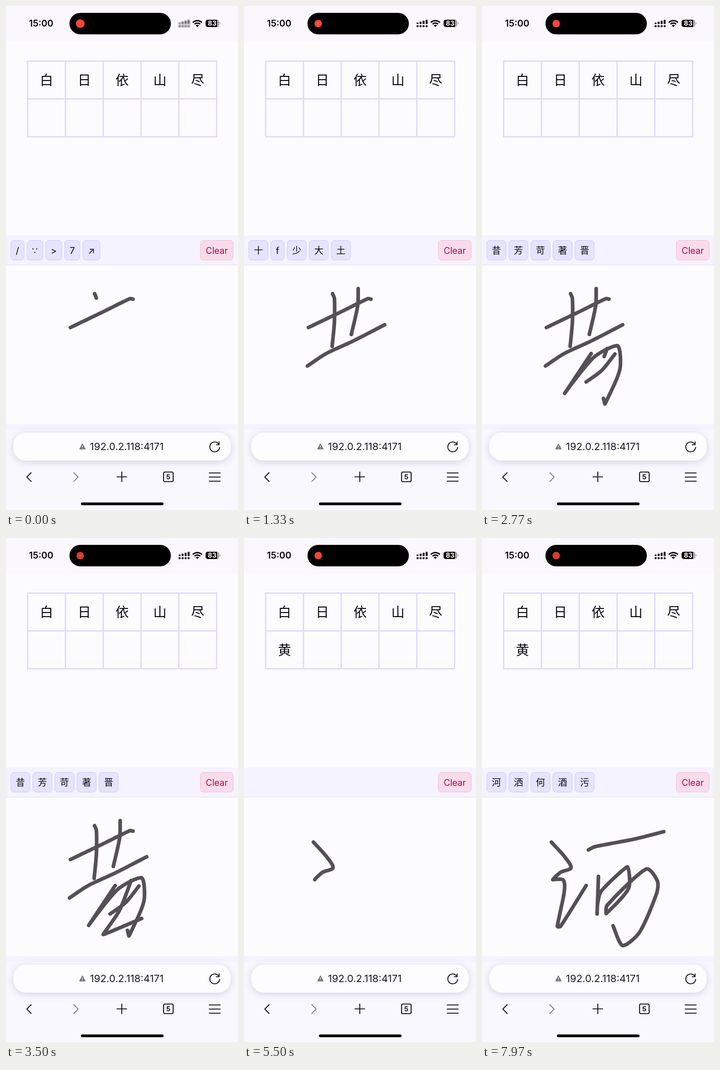
Write an HTML page with a canvas that moves like this. It is 508 by 1102 pixels and loops after 8 s.

```html
<!DOCTYPE html>
<html lang="zh-CN">
<head>
<meta charset="utf-8">
<title>Handwriting input</title>
<style>
  html, body { margin: 0; width: 508px; height: 1102px; overflow: hidden; background: #fcfcff; }
  canvas { display: block; width: 508px; height: 1102px; }
</style>
</head>
<body>
<canvas id="stage"></canvas>
<script>
const W = 508, H = 1102, LOOP = 8000;
const TAP = 4800;       // the chosen character moves into the grid
const PULSE = 1470;     // period of the recording light
const PEN_SPEED = 0.6;  // px per ms
const CELL = 82.75;
const LATIN = 'Inter, "Noto Sans", sans-serif';
const HAN = '"Noto Sans CJK SC", "Noto Sans CJK", sans-serif';
const KEYS = 'Inter, "DejaVu Sans", "Noto Sans CJK SC", sans-serif';
const DARK = '#1b1a1e', BLACK = '#050507', PAPER = '#fdfcff';

const canvas = document.getElementById('stage');
const ctx = canvas.getContext('2d');
const dpr = window.devicePixelRatio || 1;
canvas.width = W * dpr;
canvas.height = H * dpr;

const clamp = v => Math.max(0, Math.min(1, v));
const mix = (a, b, k) => a + (b - a) * k;
const dist = (a, b) => Math.hypot(b[0] - a[0], b[1] - a[1]);

// Smooth curve through key points; turns beyond a right angle stay sharp.
function curve(pts) {
  const out = [];
  const at = i => pts[Math.max(0, Math.min(pts.length - 1, i))];
  const tangent = (i, span) => {
    const [p, q, n] = [at(i - 1), at(i), at(i + 1)];
    const dot = (q[0] - p[0]) * (n[0] - q[0]) + (q[1] - p[1]) * (n[1] - q[1]);
    const cos = dot / (dist(p, q) * dist(q, n) || 1);
    const k = Math.min(0.5, span * 0.8 / (dist(p, n) || 1)) * Math.min(1, 1 + cos);
    return [(n[0] - p[0]) * k, (n[1] - p[1]) * k];
  };
  for (let i = 0; i < pts.length - 1; i++) {
    const a = pts[i], b = pts[i + 1], span = dist(a, b);
    const ta = tangent(i, span), tb = tangent(i + 1, span);
    for (let s = 0; s <= 12; s++) {
      const t = s / 12, u = 1 - t;
      out.push([0, 1].map(j => u * u * (1 + 2 * t) * a[j] + t * u * u * ta[j]
        + t * t * (1 + 2 * u) * b[j] - t * t * u * tb[j]));
    }
  }
  return out;
}

const stroke = (start, ...pts) => ({ start, path: curve(pts) });

const firstChar = [
  stroke(-700, [141, 703], [214, 668], [271, 640], [278, 641]),
  stroke(-16, [194, 629], [198, 640], [198, 690], [193, 744]),
  stroke(400, [250, 618], [249, 655], [235, 718]),
  stroke(900, [139, 787], [180, 760], [240, 732], [308, 697]),
  stroke(1460, [239, 760], [181, 847], [245, 768], [297, 743], [302, 794], [271, 867]),
  stroke(2140, [269, 870], [266, 858]),
  stroke(2380, [228, 822], [262, 797], [291, 761]),
  stroke(2740, [274, 749], [248, 815], [213, 867], [297, 832]),
  stroke(3540, [297, 832], [268, 865], [219, 911]),
  stroke(3990, [314, 867], [351, 890])
];

const secondChar = [
  stroke(5300, [152, 665], [181, 697], [195, 721], [172, 731], [155, 747], [178, 748],
    [180, 774], [165, 849], [172, 849], [228, 760]),
  stroke(6140, [233, 682], [247, 675], [335, 658], [398, 642]),
  stroke(6660, [255, 740], [252, 822]),
  stroke(6880, [253, 800], [261, 772], [318, 719], [321, 766], [272, 821], [274, 803],
    [359, 724], [384, 750], [382, 778], [345, 862], [308, 891], [287, 848])
];

const suggestions = [
  [0, '/∵>7↗'], [390, '十f少大土'], [1370, '世共芯艾母'], [2680, '昔芳苛著晋'],
  [4250, '黄贯蓑菱贵'], [TAP, ''], [5980, '三立之主兰'], [7780, '河洒何酒污']
];

function text(str, x, y, font, color) {
  ctx.font = font;
  ctx.fillStyle = color;
  ctx.textAlign = 'center';
  ctx.fillText(str, x, y);
}

function box(x, y, w, h, r, fill, edge) {
  ctx.beginPath();
  ctx.roundRect(x, y, w, h, r);
  if (fill) { ctx.fillStyle = fill; ctx.fill(); }
  if (edge) { ctx.strokeStyle = edge; ctx.stroke(); }
}

function line(color, width, ...pts) {
  ctx.strokeStyle = color;
  ctx.lineWidth = width;
  ctx.beginPath();
  pts.forEach(p => ctx.lineTo(...p));
  ctx.stroke();
}

function band(y, h, color) {
  ctx.fillStyle = color;
  ctx.fillRect(0, y, W, h);
}

function signal(haze) {
  ctx.save();
  if (haze > 0) ctx.filter = `blur(${1.6 * haze * dpr}px)`;
  ctx.globalAlpha = 1 - 0.25 * haze;
  for (let i = 0; i < 4; i++) {
    const x = 378 + i * 6.6, top = 36.2 - i * 2;
    box(x, top, 4.2, 39.5 - top, 1.2, BLACK);
    box(x, 42, 4.2, 4.2, 1.2, BLACK);
  }
  ctx.restore();
}

function wifi() {
  const fan = [-Math.PI * 0.75, -Math.PI * 0.25];
  ctx.save();
  ctx.lineCap = 'butt';
  ctx.strokeStyle = ctx.fillStyle = BLACK;
  ctx.lineWidth = 3;
  for (const r of [14, 8.8]) {
    ctx.beginPath();
    ctx.arc(419, 46, r, ...fan);
    ctx.stroke();
  }
  ctx.beginPath();
  ctx.moveTo(419, 46);
  ctx.arc(419, 46, 5, ...fan);
  ctx.fill();
  ctx.restore();
}

function battery() {
  box(437, 30, 30, 16, 5, '#a9a7ae');
  box(437, 30, 25, 16, [5, 0, 0, 5], BLACK);
  box(468, 35.5, 1.8, 5, 1, '#b5b3ba');
  text('83', 451.5, 43.2, `700 14.5px ${LATIN}`, '#fff');
}

function statusBar(t) {
  const haze = 1 - clamp((t - 100) / 300);
  const glow = (1 - Math.cos((t - 630) / PULSE * 2 * Math.PI)) / 2;
  band(0, 78, '#faf7fe');
  text('15:00', 77, 45, `600 20px ${LATIN}`, BLACK);
  box(139, 15, 222, 47, 23.5, '#000');
  ctx.fillStyle = `rgb(${mix(214, 255, glow)},${mix(62, 70, glow)},${mix(48, 58, glow)})`;
  ctx.beginPath();
  ctx.arc(162.5, 38.5, mix(8.2, 9.6, haze), 0, 7);
  ctx.fill();
  signal(haze);
  wifi();
  battery();
}

function grid(t) {
  const x0 = 47.4, y0 = 120.4, color = '#dcd9ff';
  for (let i = 0; i <= 5; i++) line(color, 2.8, [x0 + i * CELL, y0], [x0 + i * CELL, y0 + 2 * CELL]);
  for (let i = 0; i <= 2; i++) line(color, 2.8, [x0, y0 + i * CELL], [x0 + 5 * CELL, y0 + i * CELL]);
  const rows = ['白日依山尽', t < TAP ? '' : '黄'];
  rows.forEach((row, r) => [...row].forEach((ch, c) =>
    text(ch, x0 + (c + 0.5) * CELL, 173 + r * CELL, `29px ${HAN}`, '#08080a')));
}

function toolbar(t) {
  band(502, 65, '#f5f3ff');
  band(566, 1, '#dfdcf0');
  ctx.lineWidth = 1;
  const font = `20px ${KEYS}`;
  const keys = suggestions.filter(s => s[0] <= t).pop()[1];
  let x = 10.5;
  for (const ch of keys) {
    ctx.font = font;
    const w = ctx.measureText(ch).width + 22;
    box(x, 512.5, w, 43, 7, '#e6e3ff', '#cbc8f6');
    text(ch, x + w / 2, 541.5, font, '#08080a');
    x += w + 6.3;
  }
  box(425.5, 512.5, 72, 43, 7, '#f8dcec', '#f3bccb');
  text('Clear', 461.5, 541.5, `19.4px ${LATIN}`, '#b2063f');
}

function ink({ start, path }, t) {
  let left = (t - start) * PEN_SPEED;
  if (left < 0) return;
  ctx.beginPath();
  ctx.moveTo(...path[0]);
  for (let i = 1; i < path.length && left > 0; i++) {
    const a = path[i - 1], b = path[i], d = dist(a, b);
    const k = d ? clamp(left / d) : 1;
    ctx.lineTo(mix(a[0], b[0], k), mix(a[1], b[1], k));
    left -= d;
  }
  ctx.stroke();
}

function pad(t) {
  ctx.save();
  ctx.beginPath();
  ctx.rect(0, 567, W, 347);
  ctx.clip();
  ctx.strokeStyle = '#555053';
  ctx.lineWidth = 8;
  (t < TAP ? firstChar : secondChar).forEach(s => ink(s, t));
  ctx.restore();
}

function addressBar() {
  ctx.save();
  ctx.shadowColor = 'rgba(60,50,90,.2)';
  ctx.shadowBlur = 18 * dpr;
  ctx.shadowOffsetY = 3 * dpr;
  box(16, 933, 476, 61, 27, PAPER);
  ctx.restore();

  const gray = '#77747b', mid = 167.3;
  line(gray, 2, [mid, 958], [mid + 5.7, 968.5], [mid - 5.7, 968.5], [mid, 958]);
  ctx.fillStyle = gray;
  ctx.fill();
  line(PAPER, 1.4, [mid, 961.5], [mid, 964.5]);
  line(PAPER, 1.4, [mid, 967.3], [mid, 967.4]);
  text('192.0.2.118:4171', 264.5, 971, `22px ${LATIN}`, DARK);

  ctx.strokeStyle = DARK;
  ctx.lineWidth = 2;
  ctx.beginPath();
  ctx.arc(457, 964, 10.8, 0.1, Math.PI * 1.8);
  ctx.stroke();
  line(DARK, 2, [466.7, 953], [466.7, 959.2], [460.5, 959.2]);
}

function chevron(x, dir, color) {
  line(color, 2.2, [x - dir * 4.75, 1020.5], [x + dir * 4.75, 1030], [x - dir * 4.75, 1039.5]);
}

function browser() {
  band(914, 12, '#f5f3ff');
  band(926, H - 926, '#faf8ff');
  addressBar();
  chevron(50.25, -1, DARK);
  chevron(153.25, 1, '#89868e');
  line(DARK, 2.2, [243, 1029.5], [264, 1029.5]);
  line(DARK, 2.2, [253.5, 1019], [253.5, 1040]);
  box(345, 1019, 21, 21, 3, null, DARK);
  text('5', 355.5, 1035, `700 15px ${LATIN}`, DARK);
  for (let i = 0; i < 3; i++) line(DARK, 2, [445, 1021 + i * 9], [469, 1021 + i * 9]);
  box(164, 1085.5, 181, 6, 3, '#000');
}

function draw(t) {
  ctx.setTransform(dpr, 0, 0, dpr, 0, 0);
  ctx.lineCap = ctx.lineJoin = 'round';
  band(0, H, '#fcfcff');
  statusBar(t);
  grid(t);
  toolbar(t);
  pad(t);
  browser();
}

const begin = performance.now();
function tick() {
  draw((performance.now() - begin) % LOOP);
  requestAnimationFrame(tick);
}
tick();
</script>
</body>
</html>
```
